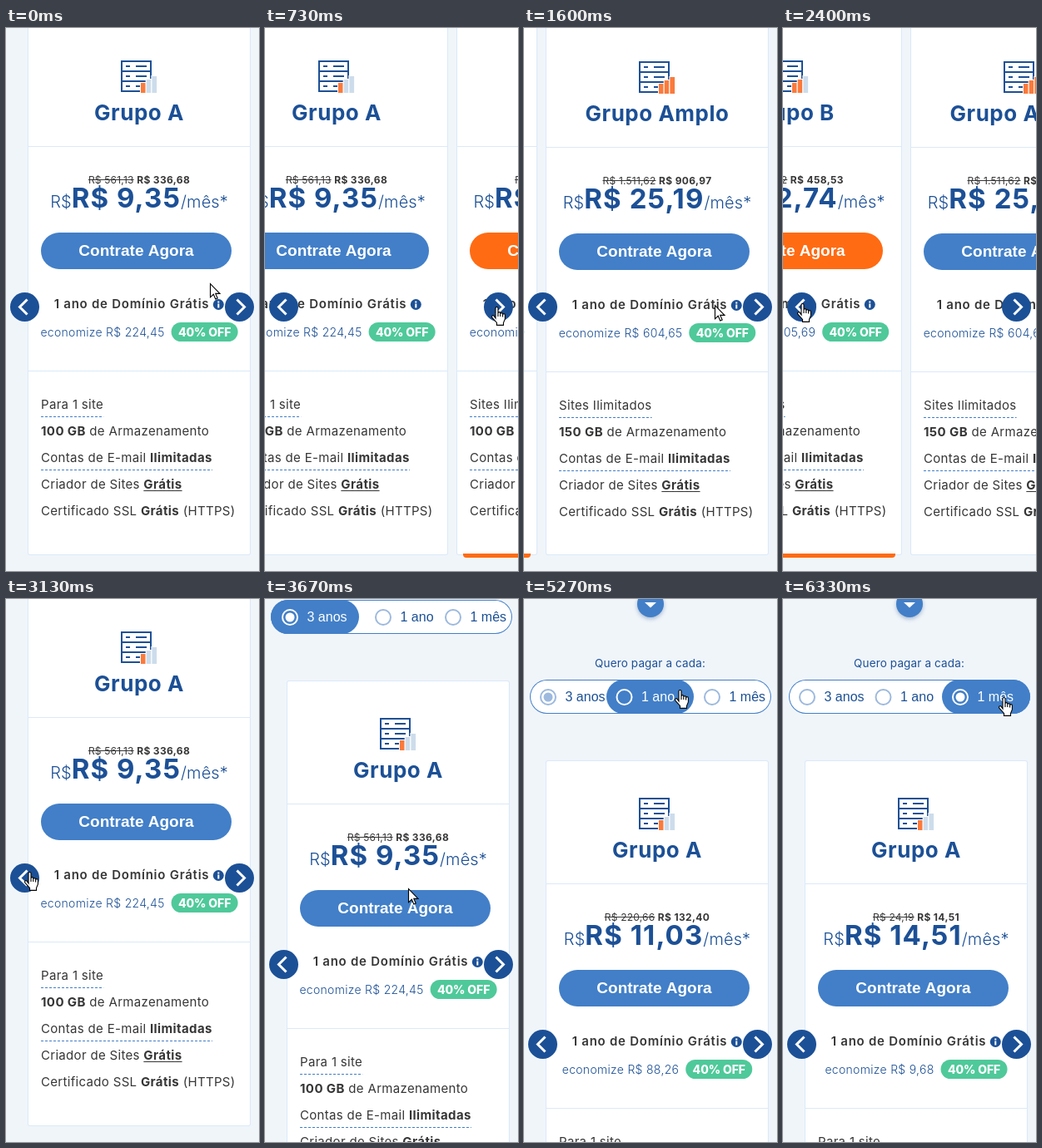
Write an HTML page with a canvas that moves like this. It is 304 px wide and 653 px high and loops after 6.39 s.

```html
<!DOCTYPE html>
<html lang="pt">
<head>
<meta charset="utf-8">
<title>Planos</title>
<style>
html, body { margin: 0; width: 100%; height: 100%; overflow: hidden; background: #f0f5fa; }
canvas { display: block; }
</style>
</head>
<body>
<canvas id="stage" width="304" height="653"></canvas>
<script>
const ctx = document.getElementById('stage').getContext('2d');
const LOOP = 6390, TICK = 1000 / 15, PITCH = 278;
const NAVY = '#1c5096', BLUE = '#427fc8', ORANGE = '#ff6b13', GREEN = '#4fc99a',
      INK = '#363636', RULE = '#dbe9f8', PALE = '#cddceb', RING = '#9db9de', PAGE = '#f0f5fa';

// font, tracking in px
const STYLE = {
  title: ['700 26px Inter, sans-serif', 0.52],
  old: ['400 12px Inter, sans-serif', 0.2],
  now: ['700 12px Inter, sans-serif', 0.35],
  unit: ['300 20px Inter, sans-serif', 0.1],
  price: ['700 33px Inter, sans-serif', 1.1],
  button: ['700 19px "Liberation Sans", Arial, sans-serif', 0],
  domain: ['600 15px Inter, sans-serif', 0.75],
  save: ['300 14px Inter, sans-serif', 0.3],
  badge: ['800 14px Inter, sans-serif', -0.1],
  item: ['400 15px Inter, sans-serif', 0.32],
  strong: ['700 15px Inter, sans-serif', 0.4],
  ask: ['400 13.5px Inter, sans-serif', 0.14],
  option: ['400 16px "Liberation Sans", Arial, sans-serif', 0]
};

const PLANS = [
  { name: 'Grupo A', bars: 1, button: BLUE, sites: 'Para 1 site', disk: '100 GB', dy: 0 },
  { name: 'Grupo B', bars: 2, button: ORANGE, sites: 'Sites Ilimitados', disk: '100 GB', dy: 0,
    cost: ['764,22', '458,53', '12,74', '305,69'] },
  { name: 'Grupo Amplo', bars: 3, button: BLUE, sites: 'Sites Ilimitados', disk: '150 GB', dy: 1,
    cost: ['1.511,62', '906,97', '25,19', '604,65'] }
];
const PERIOD_COST = [
  ['561,13', '336,68', '9,35', '224,45'],
  ['220,66', '132,40', '11,03', '88,26'],
  ['24,19', '14,51', '14,51', '9,68']
];

// tick, hotspot x, y, shape from that tick on
const CURSOR = [
  [0, 245, 307, 'arrow'], [6, 276, 335, 'hand'], [9, 276, 335, 'hand'], [14, 280, 334, 'arrow'],
  [17, 280, 334, 'hand'], [23, 280, 334, 'arrow'], [28, 23, 331, 'arrow'], [31, 23, 331, 'hand'],
  [42, 23, 331, 'hand'], [47, 28, 328, 'hand'], [48, 60, 333, 'arrow'], [51, 172, 348, 'arrow'],
  [62, 172, 348, 'arrow'], [66, 208, 190, 'arrow'], [69, 182, 95, 'arrow'], [73, 182, 95, 'hand'],
  [74, 182, 103, 'hand'], [75, 182, 103, 'hand'], [79, 187, 109, 'hand'], [81, 187, 109, 'hand'],
  [85, 227, 110, 'hand'], [86, 240, 100, 'hand'], [87, 258, 121, 'hand'], [88, 265, 118, 'hand'],
  [97, 265, 118, 'hand']
];
const ARROW = new Path2D('M.5.5V16.8L4.3 13.3 6.8 19 9.2 18 6.8 12.4H12Z');
const HAND = new Path2D('M5 14V2a1.5 1.5 0 0 1 3 0V8a1.4 1.4 0 0 1 2.8 0V9a1.4 1.4 0 0 1 2.8 0V10' +
  'a1.4 1.4 0 0 1 2.8 0V15L14.5 19.5V22.4H6.5V19.5L1 13.3a1.5 1.5 0 0 1 2.1-2.2Z');
const KNUCKLES = new Path2D('M8 8V12M10.8 9V12M13.6 10V12.5');

function ease(k, start) {
  const t = Math.min(1, Math.max(0, (k - start) / 4.1));
  return t < 0.5 ? 2 * t * t : 1 - 2 * (1 - t) ** 2;
}

function use(style) {
  ctx.font = STYLE[style][0];
  ctx.letterSpacing = STYLE[style][1] + 'px';
}

function measure(str, style) {
  use(style);
  return ctx.measureText(str).width;
}

function text(x, y, str, style, color) {
  const w = measure(str, style);
  ctx.fillStyle = color;
  ctx.fillText(str, x, y);
  return w;
}

// draws [string, style, color] runs one after another, returns each run's [x, width]
function runs(x, y, list, centered) {
  if (centered) x -= list.reduce((sum, [s, st]) => sum + measure(s, st), 0) / 2;
  return list.map(([s, st, color]) => {
    const at = x, w = text(x, y, s, st, color);
    x += w;
    return [at, w];
  });
}

function rect(x, y, w, h, color) {
  ctx.fillStyle = color;
  ctx.fillRect(x, y, w, h);
}

function pill(x, y, w, h, r, color) {
  ctx.beginPath();
  ctx.roundRect(x, y, w, h, r);
  ctx.fillStyle = color;
  ctx.fill();
}

function disc(x, y, r, color) {
  ctx.beginPath();
  ctx.arc(x, y, r, 0, 2 * Math.PI);
  ctx.fillStyle = color;
  ctx.fill();
}

function stroke(points, width, color) {
  ctx.beginPath();
  points.forEach(([x, y]) => ctx.lineTo(x, y));
  ctx.lineWidth = width;
  ctx.strokeStyle = color;
  ctx.stroke();
}

function dashes(x, y, w) {
  ctx.setLineDash([3, 2]);
  stroke([[x, y], [x + w, y]], 1, BLUE);
  ctx.setLineDash([]);
}

function serverIcon(x, y, bars) {
  ctx.strokeStyle = NAVY;
  ctx.lineWidth = 2;
  ctx.strokeRect(x + 1, y + 1, 35, 36);
  for (let i = 0; i < 3; i++) {
    const row = y + 12 * i;
    if (i) rect(x, row, 37, 2, NAVY);
    rect(x + 6, row + 6, 5, 2, NAVY);
    rect(x + 18, row + 6, 13, 2, NAVY);
  }
  for (let i = 0; i < 3; i++) {
    const left = x + 24 + 6.7 * i, top = y + 27 - 4 * i;
    rect(left - 1, top - 1, 7.7, y + 41 - top, '#fff');
    rect(left, top, 5.7, y + 39 - top, i < bars ? '#fa7a3c' : PALE);
  }
}

function card(left, y, plan, cost) {
  const mid = 134, [old, now, month, saved] = cost;
  ctx.save();
  ctx.translate(left, y);
  pill(0, -6, 268, 640, 3, RULE);
  pill(1, -5, 266, 638, 2, '#fff');
  if (plan.button === ORANGE) pill(8, 632, 252, 5, [0, 0, 4, 4], ORANGE);
  ctx.translate(0, plan.dy);
  rect(1, 142, 266, 1, RULE);
  rect(1, 412, 266, 1, RULE);

  serverIcon(112, 39, plan.bars);
  runs(mid, 111, [[plan.name, 'title', NAVY]], true);

  const [[ox, ow]] = runs(mid, 187,
    [['R$ ' + old, 'old', INK], [' ', 'old', INK], ['R$ ' + now, 'now', INK]], true);
  rect(ox, 182, ow, 1, INK);
  runs(mid, 216, [['R$', 'unit', NAVY], ['R$ ' + month, 'price', NAVY], ['/mês*', 'unit', NAVY]], true);

  pill(16, 246, 229, 44, 22, plan.button);
  runs(130.5, 274, [['Contrate Agora', 'button', '#fff']], true);

  const domain = '1 ano de Domínio Grátis';
  const dx = mid - (measure(domain, 'domain') + 18) / 2;
  const end = dx + text(dx, 337, domain, 'domain', INK);
  disc(end + 11, 332.5, 6.5, NAVY);
  rect(end + 10, 328.5, 2, 2, '#fff');
  rect(end + 10, 331.5, 2, 5, '#fff');

  const save = 'economize R$ ' + saved;
  const sx = mid - (measure(save, 'save') + 88) / 2;
  const bx = sx + text(sx, 371, save, 'save', NAVY) + 8;
  pill(bx, 354, 80, 23, 11.5, GREEN);
  runs(bx + 40, 371, [['40% OFF', 'badge', '#fff']], true);

  dashes(16, 467.5, text(16, 458, plan.sites, 'item', INK));
  runs(16, 490, [[plan.disk, 'strong', INK], [' de Armazenamento', 'item', INK]]);
  const mail = runs(16, 522, [['Contas de E-mail ', 'item', INK], ['Ilimitadas', 'strong', INK]]);
  dashes(16, 531.5, mail[0][1] + mail[1][1]);
  const [, [gx, gw]] = runs(16, 554, [['Criador de Sites ', 'item', INK], ['Grátis', 'strong', INK]]);
  rect(gx, 556, gw, 1, INK);
  runs(16, 586, [['Certificado SSL ', 'item', INK], ['Grátis', 'strong', INK], [' (HTTPS)', 'item', INK]]);
  ctx.restore();
}

function navButton(x, y, dir) {
  disc(x, y, 17.5, NAVY);
  const tip = x + dir * 6;
  stroke([[tip - dir * 9, y - 9], [tip, y], [tip - dir * 9, y + 9]], 3, '#fff');
}

function periodPicker(y, chosen, dotted) {
  ctx.save();
  ctx.translate(0, y);
  ctx.shadowColor = 'rgba(30, 70, 130, .35)';
  ctx.shadowBlur = 5;
  ctx.shadowOffsetY = 2;
  disc(152, -194, 16, BLUE);
  ctx.shadowColor = 'transparent';
  ctx.beginPath();
  ctx.moveTo(145, -196);
  ctx.lineTo(159, -196);
  ctx.lineTo(152, -189.5);
  ctx.fillStyle = '#fff';
  ctx.fill();
  runs(151.5, -118, [['Quero pagar a cada:', 'ask', NAVY]], true);

  pill(7, -103, 290, 41, 20.5, BLUE);
  pill(8, -102, 288, 39, 19.5, '#fff');
  pill([7, 99, 191][chosen], -103, [106, 105, 106][chosen], 41, 20.5, BLUE);
  const radios = [chosen === 0 ? 30 : 29, chosen === 0 ? 142 : 120.5, chosen === 2 ? 213 : 226];
  ['3 anos', '1 ano', '1 mês'].forEach((label, i) => {
    const on = i === chosen, x = radios[i], color = on ? '#fff' : RING;
    ctx.beginPath();
    ctx.arc(x, -82, 9, 0, 2 * Math.PI);
    ctx.lineWidth = 2;
    ctx.strokeStyle = color;
    ctx.stroke();
    if (i === dotted) disc(x, -82, 5.5, color);
    text(x + 20.5, -77, label, 'option', on ? '#fff' : NAVY);
  });
  ctx.restore();
}

function cursor(k) {
  let i = CURSOR.length - 2;
  while (CURSOR[i][0] > k) i--;
  const [k0, x0, y0, shape] = CURSOR[i], [k1, x1, y1] = CURSOR[i + 1];
  const p = (k - k0) / (k1 - k0), hand = shape === 'hand';
  ctx.save();
  ctx.translate(Math.round(x0 + (x1 - x0) * p) - (hand ? 6 : 0), Math.round(y0 + (y1 - y0) * p));
  const path = hand ? HAND : ARROW;
  ctx.fillStyle = '#fff';
  ctx.fill(path);
  ctx.strokeStyle = '#000';
  ctx.lineWidth = 1.1;
  ctx.stroke(path);
  if (hand) ctx.stroke(KNUCKLES);
  ctx.restore();
}

function step(k, first, second) {
  return k >= second ? 2 : k >= first ? 1 : 0;
}

function draw(k) {
  const slide = ease(k, 9.5) + ease(k, 18.754) - ease(k, 34.044) - ease(k, 42);
  const scroll = Math.round(200 * ease(k, 52.91));
  rect(0, 0, 304, 653, PAGE);
  periodPicker(scroll, step(k, 76, 92), step(k, 80, 94));
  PLANS.forEach((plan, i) => {
    const left = Math.round(26 + (i - slide) * PITCH);
    if (left > -270 && left < 304) card(left, scroll, plan, plan.cost || PERIOD_COST[step(k, 77, 93)]);
  });
  navButton(22.5, 335.5 + scroll, -1);
  navButton(280.5, 335.5 + scroll, 1);
  cursor(k);
}

// the picture advances 15 times a second
const start = performance.now();
function loop() {
  const t = (performance.now() - start) % LOOP;
  draw(Math.min(95, Math.floor((t + 3.4) / TICK)));
  requestAnimationFrame(loop);
}
loop();
</script>
</body>
</html>
```
